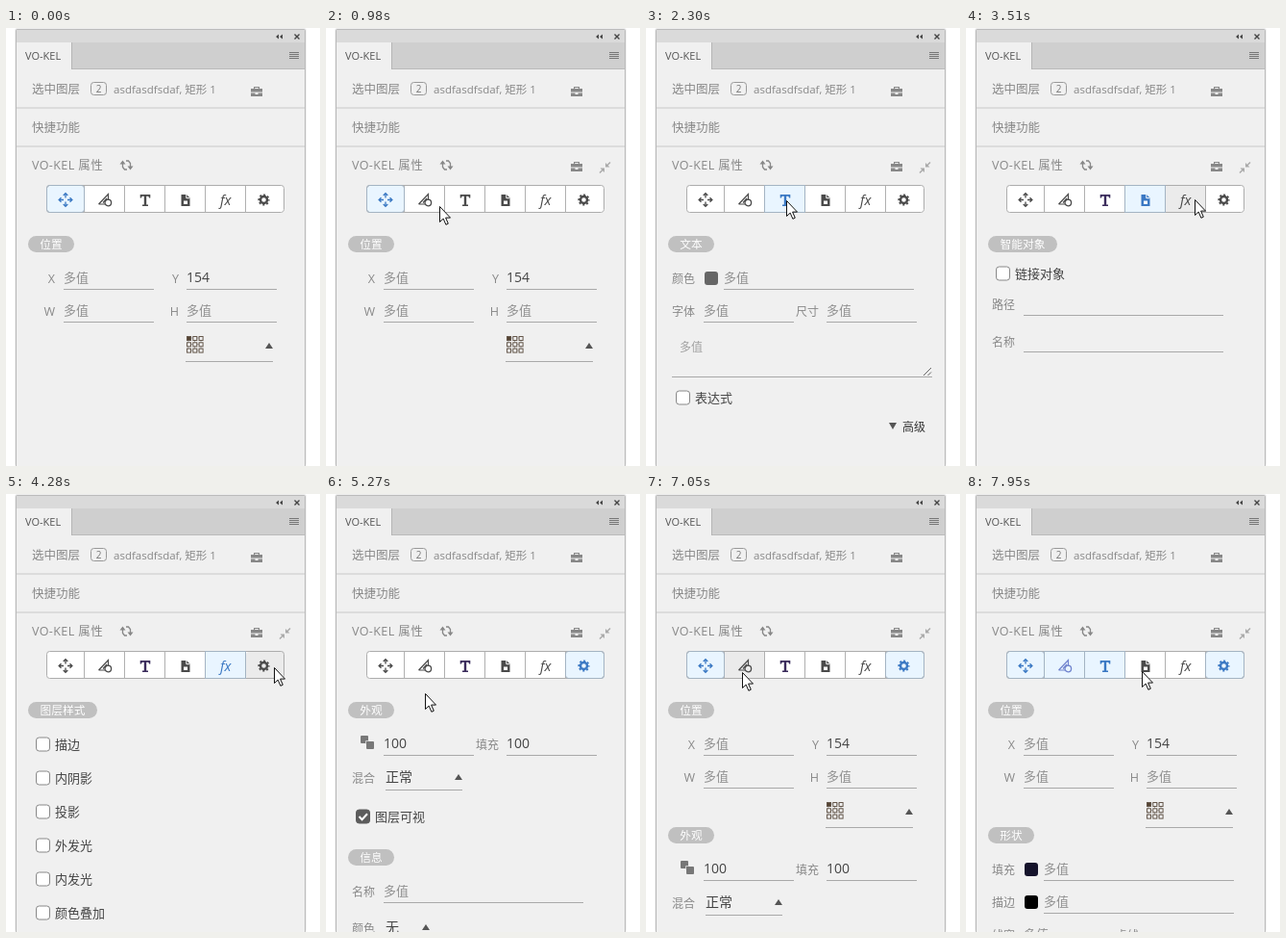
Recreate the animation shown at these times as an HTML page. Size 327 by 455 pixels, loop 8000 ms.

```html
<!DOCTYPE html>
<html lang="zh">
<head>
<meta charset="utf-8">
<title>属性面板</title>
<style>
html, body { margin: 0; width: 100%; height: 100%; overflow: hidden; background: #fff; }
svg { display: block; font-family: "Open Sans", "Noto Sans CJK SC", "Noto Sans CJK", sans-serif; }
</style>
</head>
<body>
<svg id="stage" width="327" height="455" viewBox="0 0 327 455"></svg>
<script>
const LOOP = 8000, STEP = 110;
const GRAY = '#888', DARK = '#444', BLUE = '#3a78c3';
const stage = document.getElementById('stage');

// Text is placed by its left edge and vertical centre.
const text = (x, y, s, size = 12, fill = GRAY, extra = '') =>
  `<text x="${x}" y="${y + size * .38}" font-size="${size}" fill="${fill}" ${extra}>${s}</text>`;
const rect = (x, y, w, h, fill, extra = '') =>
  `<rect x="${x}" y="${y}" width="${w}" height="${h}" fill="${fill}" ${extra}/>`;
const path = (d, fill = 'none', extra = '') => `<path d="${d}" fill="${fill}" ${extra}/>`;
const stroke = (d, color, w = 1) => path(d, 'none', `stroke="${color}" stroke-width="${w}"`);
const at = (x, y, s) => `<g transform="translate(${x} ${y})">${s}</g>`;

const line = (x1, x2, y) => rect(x1, y, x2 - x1, 1, '#a9a9a9');
const up = (x, y) => path(`M${x - 4} ${y + 3}h8l-4 -6z`, '#555');
const right = (x, y, s) => text(x, y, s, 12.5, GRAY, 'text-anchor="end"');
const pill = (y, s) => {
  const w = s.length * 12 + 24;
  return rect(23, y - 9, w, 17, '#c0c0c0', 'rx="8.5"') +
    text(23 + w / 2, y, s, 11.7, '#fff', 'text-anchor="middle" font-weight="500"');
};
const field = (x1, x2, y, value = '') =>
  text(x1, y - 1, value, /\d/.test(value) ? 14 : 13, /\d/.test(value) ? DARK : '#909090') + line(x1, x2, y + 11);
const select = (x1, x2, y, value, tip) =>
  text(x1, y - 1, value, 14, DARK) + up(tip, y - 1) + line(x1, x2, y + 12);
const swatch = (y, label, color) =>
  text(27, y, label) + rect(61, y - 7, 14, 14, color, 'rx="3"') + field(81, 279, y, '多值');
const check = (y, label, on) =>
  rect(31.5, y - 7, 14, 14, on ? '#5c5c5c' : '#fff', `rx="3" stroke="${on ? '#5c5c5c' : '#888'}"`) +
  (on ? stroke(`M34.5 ${y}l3 3.2 5.5 -6`, '#fff', 2) : '') + text(51, y, label, 13, DARK);
const more = y => path(`M253 ${y - 3}h8l-4 7z`, '#555') + text(267, y + 1, '高级', 12, '#333');

function anchorGrid(x, y) {
  let s = stroke(`M${x + 2} ${y + 2}h13v13h-13zM${x + 2} ${y + 8.5}h13M${x + 8.5} ${y + 2}v13`, '#aaa');
  for (let i = 0; i < 9; i++)
    s += rect(x + .5 + i % 3 * 6.3, y + .5 + (i / 3 | 0) * 6.3, 4, 4, i ? '#f0f0f0' : '#554433', 'stroke="#65584c"');
  return s;
}

// Panels in stacking order; coordinates are relative to the title pill.
const panels = [
  { height: 130, draw: () => pill(0, '位置') +
    right(51, 35, 'X') + field(60, 154, 35, '多值') + right(180, 35, 'Y') + field(188, 282, 35, '154') +
    right(51, 69, 'W') + field(60, 154, 69, '多值') + right(180, 69, 'H') + field(188, 282, 69, '多值') +
    anchorGrid(188, 95) + up(274, 105) + line(187, 278, 121) },
  { height: 162, draw: () => pill(0, '形状') +
    swatch(35, '填充', '#15132b') + swatch(69, '描边', '#000') +
    text(27, 103, '线宽') + field(60, 154, 103, '多值') + text(156, 103, '虚线') + field(188, 282, 103) + more(131) },
  { height: 220, draw: () => pill(0, '文本') +
    swatch(35, '颜色', '#666') +
    text(27, 69, '字体') + field(60, 154, 69, '多值') + text(156, 69, '尺寸') + field(188, 282, 69, '多值') +
    text(35, 106, '多值', 12, '#a0a0a0') + line(27, 298, 137) + stroke('M289 136l8 -8M293.500 136l3.500 -3.500', '#666') +
    check(159, '表达式') + more(188) },
  { height: 130, draw: () => pill(0, '智能对象') + check(30, '链接对象') +
    text(27, 62, '路径') + field(60, 268, 62) + text(27, 101, '名称') + field(60, 268, 100) },
  { height: 240, draw: () => pill(0, '图层样式') +
    ['描边', '内阴影', '投影', '外发光', '内发光', '颜色叠加'].map((s, i) => check(35 + i * 35, s)).join('') },
  { height: 250, draw: () => pill(0, '外观') +
    rect(36, 26, 8, 8, '#777', 'rx="1"') + rect(42, 32, 8, 8, '#777', 'rx="1"') + stroke('M41.500 34.500v-3h3', '#ccc') +
    field(60, 154, 35, '100') + text(156, 35, '填充') + field(188, 282, 35, '100') +
    text(27, 70, '混合') + select(62, 142, 70, '正常', 138) + check(110, '图层可视', true) +
    pill(153, '信息') + text(27, 188, '名称') + field(60, 268, 188, '多值') +
    text(27, 226, '颜色') + select(62, 108, 226, '无', 104) }
];

// Toolbar icons, drawn around their own centre.
const arrow = a => `<path d="M0 -2V-6.500M-2.300 -4.500L0 -6.900L2.300 -4.500" transform="rotate(${a})"/>`;
const icons = [
  c => `<g fill="none" stroke="${c}" stroke-width="1.300">${[0, 90, 180, 270].map(arrow).join('')}</g>`,
  c => stroke('M-6.500 4.500L3.500 -6V0M-6.500 4.500H0M-2 3L2 -1.500', c, 1.2) +
    `<circle cx="3.300" cy="3" r="3.300" fill="none" stroke="${c}" stroke-width="1.300"/>`,
  c => path('M-5.300 -5.500H5.300V-2H4L3.300 -3.800H1.200V5H3V6.500H-3V5H-1.200V-3.800H-3.300L-4 -2H-5.300z', c),
  c => path('M-4.500 -5.500H1L4.500 -2V6.500H-4.500z', c) + path('M.8 -5.500V-1.800H4.500', 'none', 'stroke="#fff"') +
    path('M-2 1H2V4.500H-2z', '#fff'),
  c => text(-6, 0, 'fx', 14.5, c, 'font-style="italic"'),
  c => `<circle r="3.500" fill="none" stroke="${c}" stroke-width="2.400"/>
    <circle r="5.200" fill="none" stroke="${c}" stroke-width="1.800" stroke-dasharray="2.042" stroke-dashoffset="1.021"/>`
];
const edges = [43, 82, 124, 166, 208, 250, 290];

// [time, selected buttons] and [time, button held down]
const picks = [[0, [0]], [1750, [1]], [2300, [2]], [3080, [3]], [3630, [4]], [4400, [5]],
  [6060, [0, 5]], [7060, [0, 1, 5]], [7500, [0, 1, 2, 5]]];
const presses = [[2190, 2], [2970, 3], [3510, 4], [4280, 5], [5950, 0], [6950, 1], [7390, 2]];

// Pointer moves in even jumps: [first jump, last jump, x, y]
const moves = [[200, 980, 118, 185], [1100, 1200, 114, 180], [1860, 2080, 146, 179], [2520, 2640, 183, 179],
  [3180, 3290, 238, 178], [3730, 3950, 279, 180], [5050, 5160, 140, 216], [5270, 5270, 103, 207],
  [5380, 5830, 70, 183], [6280, 6730, 100, 185], [7170, 7280, 142, 185], [7610, 7730, 171, 184],
  [7830, 7950, 183, 184]];

function pointer(t) {
  let x = 70, y = 470;
  for (const [from, to, tx, ty] of moves) {
    if (t < from) break;
    const n = Math.round((to - from) / STEP) + 1;
    const k = to === from ? 1 : Math.min(1, (Math.floor((t - from) / (to - from) * (n - 1) + 1e-6) + 1) / n);
    x += (tx - x) * k;
    y += (ty - y) * k;
  }
  return [Math.round(x), Math.round(y)];
}

const briefcase = y => at(261, y, path('M-6 -3h3v-2h6v2h3v3.500h-12zM-1.800 -3h3.600v-1h-3.600zM-6 1.500h4.500v1.500h3v-1.500h4.500v3.500h-12z', GRAY, 'fill-rule="evenodd"'));
const heading = (y, s, extra = '') => text(27, y, s, 12.5, GRAY, `font-weight="500" ${extra}`);

const frame = rect(9, 0, 304, 455, '#ededed', 'rx="3"') + rect(10, 1, 302, 460, '#bbb', 'rx="2"') +
  rect(11, 2, 300, 453, '#f0f0f0') +
  rect(11, 2, 300, 13, '#dadada') + rect(11, 15, 300, 28, '#cfcfcf') + rect(11, 42, 300, 1, '#bbb') +
  rect(11, 15, 57, 28, '#f0f0f0') + rect(68, 15, 1, 28, '#b5b5b5') +
  path('M284 6.500v5l-3 -2.500zM288 6.500v5l-3 -2.500z', '#444') + stroke('M300.500 6.500l5 5m0 -5l-5 5', '#444', 1.4) +
  [25, 27, 29, 31].map(y => rect(295, y, 10, 1, '#777')).join('') +
  text(20, 29, 'VO-KEL', 11, '#555') +
  rect(11, 82, 300, 2, '#dcdcdc') + rect(11, 122, 300, 2, '#dcdcdc') +
  heading(63, '选中图层') + rect(88.5, 56.5, 16, 13, 'none', 'rx="3" stroke="#999"') +
  text(96.5, 63, '2', 10, '#777', 'text-anchor="middle"') +
  text(112, 63.5, 'asdfasdfsdaf, 矩形 1', 11.5) + briefcase(66) +
  heading(103, '快捷功能') + heading(142.5, 'VO-KEL 属性', 'letter-spacing=".4"') +
  stroke('M121.500 139.500v5l2 2.500h2.500M129.500 145.500v-5l-2 -2.500h-2.500', GRAY, 1.3) +
  path('M118.500 141.500l3 -4 3 4zM126.500 143.500l3 4 3 -4z', GRAY);
const hoverTools = briefcase(144) +
  stroke('M296 139.500l-4 4M285 150.500l4 -4', '#aaa', 1.5) + path('M291 140v4.500h4.500zM290 150v-4.500h-4.500z', '#aaa');

function toolbar(t, chosen, held) {
  let s = rect(43, 164, 247, 28, '#fff', 'rx="3"');
  icons.forEach((icon, i) => {
    const x = edges[i], w = edges[i + 1] - x, on = chosen.includes(i);
    const fill = on ? '#e9f5ff' : i === held ? '#ebebeb' : '#fff';
    const plain = i === 2 && t > 2300 ? '#3b2c5c' : '#4a4a4a';
    s += rect(x, 164, w, 28, fill, i % 5 ? '' : 'rx="3"');
    s += at(i ? x + w / 2 - (i === 5 ? 1.5 : 0) : 62, 178.5, icon(on ? (i === 1 ? '#7083ce' : BLUE) : plain));
  });
  s += rect(42.5, 163.5, 247, 28, 'none', 'rx="3" stroke="#adadad"');
  for (let i = 1; i < 6; i++) s += rect(edges[i] - 1, 164, 1, 28, '#b0b0b0');
  for (const i of chosen)
    s += rect(edges[i] - .5, 163.5, edges[i + 1] - edges[i], 28, 'none', `stroke="#a4b4c3" ${i % 5 ? '' : 'rx="3"'}`);
  return s;
}

let shown = '';
function render(t) {
  const chosen = picks.filter(p => p[0] <= t).pop()[1];
  const press = presses.find(p => t >= p[0] && t < p[0] + STEP);
  const [x, y] = pointer(t), key = [chosen, press, x, y, t >= 200].join('|');
  if (key !== shown) {
    shown = key;
    let top = 225, body = '';
    for (const i of chosen) {
      body += at(0, top, panels[i].draw());
      top += panels[i].height;
    }
    stage.innerHTML = frame + (t >= 200 ? hoverTools : '') + toolbar(t, chosen, press && press[1]) + body +
      at(x + .5, y + .5, path('M0 0V16L3.700 12.600L6.400 18.800L8.800 17.700L6.100 11.600H11z', '#fff', 'stroke="#111"'));
  }
}

function tick() {
  render(performance.now() % LOOP);
  requestAnimationFrame(tick);
}
tick();
</script>
</body>
</html>
```
